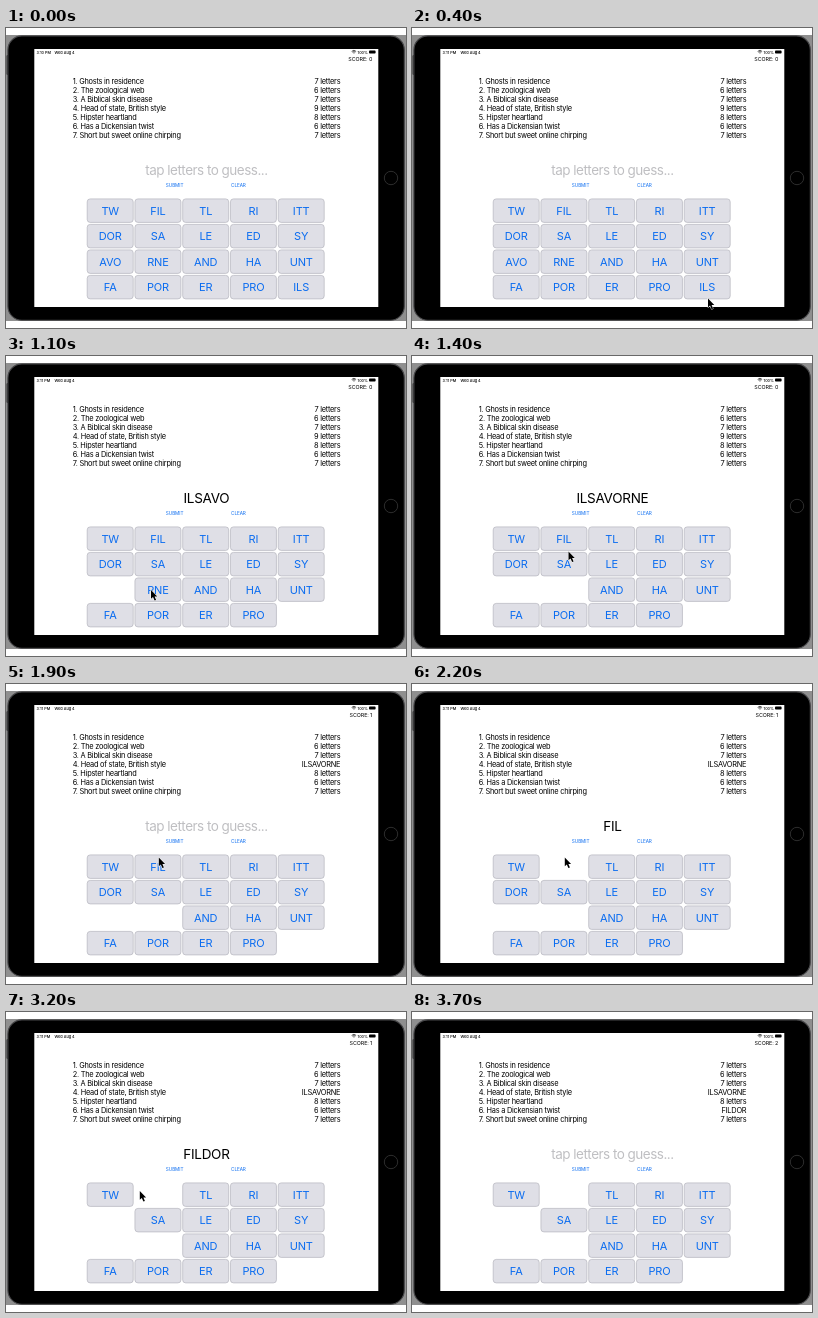
Recreate the animation shown at these times as an HTML page with a canvas. Size 400 by 300 pixels, loop 3800 ms.

```html
<!DOCTYPE html>
<html lang="en">
<head>
<meta charset="utf-8">
<title>Word tiles</title>
<style>
html, body { margin: 0; width: 100%; height: 100%; overflow: hidden; background: #fff; }
canvas { display: block; width: 400px; height: 300px; }
</style>
</head>
<body>
<canvas id="stage"></canvas>
<script>
const LOOP = 3800, STEP = 100;
const BLUE = '#0a6cf0';
const canvas = document.getElementById('stage');
const ctx = canvas.getContext('2d');
const dpr = window.devicePixelRatio || 1;
canvas.width = 400 * dpr;
canvas.height = 300 * dpr;

const clues = [
  ['Ghosts in residence', 7],
  ['The zoological web', 6],
  ['A Biblical skin disease', 7],
  ['Head of state, British style', 9],
  ['Hipster heartland', 8],
  ['Has a Dickensian twist', 6],
  ['Short but sweet online chirping', 7]
];
const tiles = ('TW FIL TL RI ITT DOR SA LE ED SY ' +
  'AVO RNE AND HA UNT FA POR ER PRO ILS').split(' ');

// Each tap uses up a tile or submits the word for a clue row.
const submit = { x: 168, y: 157 };
const taps = [
  { at: 500, tile: 'ILS', x: 296, y: 270.6 },
  { at: 1000, tile: 'AVO', x: 107, y: 235 },
  { at: 1200, tile: 'RNE', x: 145, y: 234 },
  { at: 1600, row: 3, ...submit },
  { at: 2000, tile: 'FIL', x: 152.8, y: 173.5 },
  { at: 3000, tile: 'DOR', x: 99.6, y: 201 },
  { at: 3400, row: 5, ...submit }
];

function gameAt(t) {
  const game = { word: '', used: new Set(), solved: new Map() };
  for (const tap of taps.filter(p => p.at <= t)) {
    if (tap.tile) {
      game.word += tap.tile;
      game.used.add(tap.tile);
    } else {
      game.solved.set(tap.row, game.word);
      game.word = '';
    }
  }
  return game;
}

function text(str, x, y, size, o = {}) {
  ctx.font = `${o.weight || 400} ${size}px Inter, Roboto, "Open Sans", sans-serif`;
  ctx.letterSpacing = (o.track || 0) * size + 'px';
  ctx.textAlign = o.align || 'left';
  ctx.fillStyle = o.color || '#000';
  ctx.fillText(str, x, y);
}

function box(x, y, w, h, r, fill, stroke, line = 0.7) {
  ctx.beginPath();
  ctx.roundRect(x, y, w, h, r);
  ctx.fillStyle = fill;
  ctx.fill();
  if (stroke) {
    ctx.strokeStyle = stroke;
    ctx.lineWidth = line;
    ctx.stroke();
  }
}

function device() {
  box(0, 0, 400, 300, 0, '#fff');
  box(0, 7, 400, 286, 0, '#8f8f8f');
  box(0.6, 27, 3, 20, 1, '#222');
  box(1.9, 7.9, 396.4, 284.4, 14, '#000', '#48484a', 1.1);
  box(28.3, 21, 344, 258, 0, '#fff');
  ctx.beginPath();
  ctx.arc(385, 150, 6.7, 0, Math.PI * 2);
  ctx.strokeStyle = '#333';
  ctx.lineWidth = 0.9;
  ctx.stroke();
}

function statusBar(t) {
  const o = { weight: 500 };
  text(t < 300 ? '3:10 PM' : '3:11 PM', 30.5, 25.5, 3.8, o);
  text('Wed Aug 4', 48.5, 25.5, 3.8, o);
  text('100%', 361.8, 25.5, 3.8, { ...o, align: 'right' });
  ctx.strokeStyle = '#000';
  ctx.lineWidth = 0.7;
  for (let r = 0.7; r < 3.5; r += 1.2) {
    ctx.beginPath();
    ctx.arc(347.9, 25.6, r, -Math.PI * 0.75, -Math.PI * 0.25);
    ctx.stroke();
  }
  box(363, 22.6, 6.6, 3, 0.8, '#000');
}

function board({ word, used, solved }) {
  text('SCORE: ' + solved.size, 366.2, 32.6, 5.4, { align: 'right', track: -0.02 });

  const o = { track: -0.033 };
  clues.forEach(([clue, count], i) => {
    const y = 55.7 + i * 9.08;
    text(`${i + 1}. ${clue}`, 66.7, y, 7.4, o);
    text(solved.get(i) || count + ' letters', 334.3, y, 7.4, { ...o, align: 'right' });
  });

  if (word) text(word, 200.4, 147, 13.5, { align: 'center', track: -0.02 });
  else text('tap letters to guess...', 200.4, 146.6, 13.5,
    { align: 'center', track: -0.038, color: '#bfbfc2' });

  const link = { align: 'center', color: BLUE, track: -0.02 };
  text('SUBMIT', 168.6, 159.2, 4.7, link);
  text('CLEAR', 232.4, 159.2, 4.7, link);

  tiles.forEach((label, i) => {
    if (used.has(label)) return;
    const x = 81.2 + (i % 5) * 47.75, y = 170.9 + Math.floor(i / 5) * 25.5;
    box(x, y, 46, 23.5, 3, '#dfdfe6', '#b5b5bd');
    text(label, x + 23, y + 15.8, 11, { align: 'center', color: BLUE, track: -0.015 });
  });
}

// Rests after a tap, then glides to arrive one step before the next.
function pointer(t) {
  if (t < 300 || t > 3500) return;
  const next = taps.find(p => p.at > t) || taps.at(-1);
  const prev = taps[Math.max(0, taps.indexOf(next) - 1)];
  const end = next.at - STEP;
  const start = Math.max(prev.at + STEP, next.at - 500);
  const k = t >= end ? 1 : Math.max(0, (t - start) / (end - start));
  const e = k * k * (3 - 2 * k);
  ctx.save();
  ctx.translate(prev.x + (next.x - prev.x) * e, prev.y + (next.y - prev.y) * e);
  const arrow = new Path2D('M0 0V8.8L2 7L3.6 10.6L5.1 9.9L3.6 6.5L6.3 6.4Z');
  ctx.strokeStyle = '#fff';
  ctx.lineWidth = 1;
  ctx.stroke(arrow);
  ctx.fillStyle = '#000';
  ctx.fill(arrow);
  ctx.restore();
}

const origin = performance.now();

function draw() {
  const t = Math.floor(((performance.now() - origin) % LOOP) / STEP) * STEP;
  ctx.setTransform(dpr, 0, 0, dpr, 0, 0);
  device();
  statusBar(t);
  board(gameAt(t));
  pointer(t);
  requestAnimationFrame(draw);
}
draw();
</script>
</body>
</html>
```
